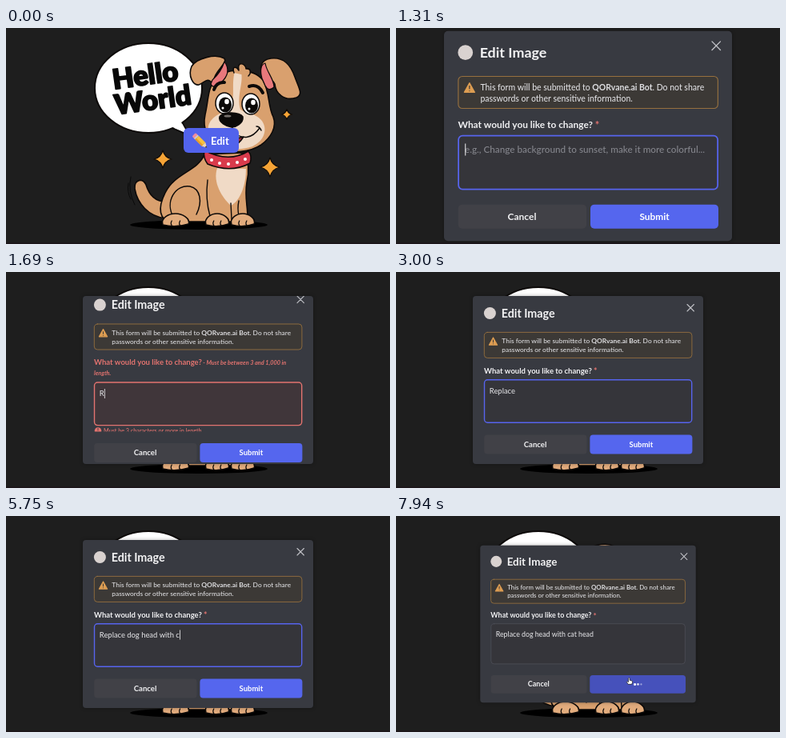
Recreate the animation shown at these times as an HTML page with a canvas. Size 480 by 270 pixels, loop 8000 ms.

```html
<!DOCTYPE html>
<html lang="en">
<head>
<meta charset="utf-8">
<title>Edit Image</title>
<style>
html, body { margin: 0; width: 100%; height: 100%; overflow: hidden; background: #1e1e1e; }
canvas { display: block; width: 480px; height: 270px; }
</style>
</head>
<body>
<canvas id="stage"></canvas>
<script>
const LOOP = 8000;
const FONT = 'Lato, "Open Sans", sans-serif';
const INK = '#0d0a09', TAN = '#d9a06e', CREAM = '#f0dac6', PINK = '#e8787c';
const BLURPLE = '#5566ee', RED = '#e2736f', MODAL = '#383a41';

const canvas = document.getElementById('stage');
const ctx = canvas.getContext('2d');
const dpr = window.devicePixelRatio || 1;
canvas.width = 480 * dpr;
canvas.height = 270 * dpr;

// Typing runs: start time, gap between keys, characters
const RUNS = [
  [1620, 0, 'R'], [1940, 62, 'eplace'], [2500, 0, ' '], [3190, 78, 'dog '],
  [3750, 98, 'head wit'], [5130, 0, 'h'], [5310, 0, ' '], [5750, 90, 'cat head']
];
const KEYS = RUNS.flatMap(([start, gap, s]) => [...s].map((ch, i) => ({ at: start + i * gap, ch })));

const clamp = v => Math.max(0, Math.min(1, v));
const progress = (t, from, to) => clamp((t - from) / (to - from));
const easeInOut = p => p * p * (3 - 2 * p);
const easeOut = p => 1 - (1 - p) ** 3;

// Rises to 1.25, then settles at 1
function pop(ms) {
  return ms < 180 ? 1.25 * easeOut(clamp(ms / 180)) : 1.25 - 0.25 * easeInOut(progress(ms, 200, 470));
}

function shape(d, fill, line = 1.6, stroke = INK) {
  const p = new Path2D(d);
  if (fill) { ctx.fillStyle = fill; ctx.fill(p); }
  if (line) { ctx.lineWidth = line; ctx.strokeStyle = stroke; ctx.stroke(p); }
}

function oval(x, y, rx, ry, fill, line = 0, tilt = 0) {
  ctx.beginPath();
  ctx.ellipse(x, y, rx, ry, tilt, 0, 7);
  ctx.fillStyle = fill;
  ctx.fill();
  if (line) { ctx.lineWidth = line; ctx.strokeStyle = INK; ctx.stroke(); }
}

function box(x, y, w, h, r, fill, stroke, line = 1) {
  ctx.beginPath();
  ctx.roundRect(x, y, w, h, r);
  ctx.fillStyle = fill;
  ctx.fill();
  if (stroke) { ctx.strokeStyle = stroke; ctx.lineWidth = line; ctx.stroke(); }
}

// Draws text and returns the x where it ends
function text(s, x, y, size, color, style = '500', align = 'left') {
  ctx.font = `${style} ${size}px ${FONT}`;
  ctx.fillStyle = color;
  ctx.textAlign = align;
  ctx.fillText(s, x, y);
  return x + ctx.measureText(s).width;
}

function scaled(x, y, s, draw) {
  ctx.save();
  ctx.translate(x, y);
  ctx.scale(s, s);
  ctx.translate(-x, -y);
  draw();
  ctx.restore();
}

function sparkle(x, y, r) {
  const k = r * 0.2;
  shape(`M${x} ${y - r}Q${x + k} ${y - k} ${x + r} ${y}Q${x + k} ${y + k} ${x} ${y + r}` +
    `Q${x - k} ${y + k} ${x - r} ${y}Q${x - k} ${y - k} ${x} ${y - r}Z`, '#f6a436', 1.2);
}

function bubble() {
  shape('M198 121L229 134L216 110Z', '#fff', 2);
  oval(178, 75, 67, 56, '#fff', 2);
  shape('M199 120L227 132L214 109Z', '#fff', 0);
  ctx.save();
  ctx.translate(174, 59);
  ctx.rotate(-0.14);
  ctx.strokeStyle = '#080808';
  ctx.lineWidth = 1.6;
  [['Hello', 0, 12], ['World', 5, 44]].forEach(([s, x, y]) => {
    text(s, x, y, 34.5, '#080808', '900', 'center');
    ctx.strokeText(s, x, y);
  });
  ctx.restore();
}

function paw(x, y, w) {
  shape(`M${x - w} ${y + 6}C${x - w - 3} ${y - 3} ${x - w / 2} ${y - 8} ${x} ${y - 8}` +
    `C${x + w / 2} ${y - 8} ${x + w + 3} ${y - 2} ${x + w} ${y + 5}Q${x} ${y + 10} ${x - w} ${y + 6}Z`, '#e2ac7d');
  [-0.3, 0.35].forEach(k => shape(`M${x + k * w} ${y + 1}q-2 3 0 6`, null, 1.2));
}

function body() {
  oval(241, 246, 86, 6, '#000');
  shape('M156 186Q152 204 161 221M153 194Q151 205 156 214', null, 1, '#0a0a0a');
  shape('M200 238C178 236 164 219 161 201C160 189 171 187 175 196C179 209 187 218 202 217Z', TAN);
  shape('M248 158C240 179 211 181 199 206C189 226 192 240 206 242L299 242C306 233 297 217 301 193C304 180 303 166 298 156Z', TAN);
  shape('M264 175C258 193 270 212 281 222C293 216 300 196 300 176Z', CREAM, 0);
  shape('M210 238C197 216 213 195 230 198C243 201 246 217 238 233', null, 1.5);
  shape('M252 190Q249 214 255 235M281 219L282 239M291 216Q289 226 291 234', null, 1.4);
  paw(212, 240, 16);
  paw(264, 240, 14);
  paw(296, 240, 14);
}

function collar() {
  shape('M248 153Q278 169 303 154Q308 160 305 169Q281 182 252 170Q246 162 248 153Z', '#d93b4c');
  [[257, 165], [267, 169], [278, 170], [289, 168], [299, 164]].forEach(([x, y]) => oval(x, y, 2, 2, '#fff'));
}

function eye(x, y) {
  oval(x, y, 11, 13, '#fff', 1.5);
  oval(x + 1, y + 2, 8, 9.5, '#0b0908');
  oval(x + 3, y - 2, 2.8, 3.2, '#fff');
  oval(x - 2, y + 6, 1.5, 1.5, '#fff');
}

function head() {
  shape('M261 63C252 77 253 91 249 108C245 126 253 141 266 149C282 158 306 155 319 146C331 137 339 124 334 111C327 97 330 80 321 65C309 50 276 49 261 63Z', TAN);
  shape('M286 54C281 74 288 85 279 103C259 108 249 119 254 133C263 152 288 155 308 148C323 141 328 126 319 115C311 106 301 107 293 102C288 84 297 70 294 55Z', CREAM, 0);
  shape('M260 64C262 53 277 44 273 38C262 32 239 37 232 48C227 60 234 72 241 71C249 68 251 61 258 69Z', TAN);
  shape('M258 65Q269 55 273 42Q283 56 268 69Q259 77 256 70Z', PINK, 1.2);
  shape('M322 64C316 51 317 40 331 38C348 36 356 47 361 61C366 75 372 83 363 87C348 92 337 82 336 70C333 64 327 62 322 64Z', TAN);
  shape('M320 63C317 52 319 45 324 44C326 56 335 63 335 74Q328 80 324 72Z', PINK, 1.2);
  shape('M285 56C282 47 288 48 291 53C288 41 300 44 300 51C306 50 307 56 303 60', TAN, 1.5);
  shape('M260 77Q263 67 273 68M304 73Q315 69 321 81', null, 4);
  eye(273, 94);
  eye(306, 95);
  shape('M267 111C271 104 292 105 296 111C297 119 287 124 282 124C276 123 265 118 267 111Z', '#0b0908');
  oval(277, 110, 4.5, 1.6, '#76706c');
  shape('M283 123V130M256 127Q267 143 283 130Q303 145 317 125M313 123Q317 123 319 128', null, 1.5);
  shape('M270 136Q283 158 297 136Q284 140 270 136Z', '#9e3039', 1.4);
}

function dog() {
  bubble();
  sparkle(196, 164, 11);
  sparkle(330, 174, 12);
  sparkle(351, 108, 6.5);
  body();
  collar();
  head();
}

function pencil(x, y) {
  ctx.save();
  ctx.translate(x, y);
  ctx.rotate(Math.PI / 4);
  box(-11, -3.2, 5, 6.4, 1.5, '#f08c9c');
  box(-7.5, -3.2, 2, 6.4, 0, '#c9cbd3');
  box(-5.5, -3.2, 12, 6.4, 0, '#f7c23e');
  box(-5.5, 1, 12, 2.2, 0, '#e59a2c');
  shape('M6.5 -3.2L12 0L6.5 3.2Z', '#f3d6ae', 0);
  shape('M10 -1.2L12.4 0L10 1.2Z', '#39312e', 0);
  ctx.restore();
}

function hand(x, y, s) {
  ctx.save();
  ctx.translate(x, y);
  ctx.scale(s, s);
  shape('M-1 1Q0 -.6 1 1V4L4.5 5Q5.5 5.5 5 7.5L4 10H-1.2L-3.6 6.6Q-3.4 5 -1 6.4Z', '#fff', 0.8, '#111');
  ctx.restore();
}

function editButton(t) {
  const s = t < 130 ? 1 : 1 + 1.39 * pop(t - 130);
  scaled(256.5, 140.5, s, () => {
    box(222, 125, 69, 31, 6, t > 760 ? '#4854cf' : '#5263ec');
    pencil(242.5, 141);
    text('Edit', 256, 145.7, 13, '#fff', '700');
  });
  if (t > 300) {
    const p = easeInOut(progress(t, 300, 880)), q = 1 - p;
    hand(q * q * 388 + 2 * q * p * 345 + p * p * 285, q * q * 52 + 2 * q * p * 250 + p * p * 150, 2.2);
  }
}

function warning() {
  box(110.3, 75.4, 259.6, 32, 4, '#3c3936', '#96703f', 0.9);
  shape('M121.5 82L126.6 91.2H116.4Z', '#dd9d52', 1.2, '#dd9d52');
  box(121, 84.6, 1, 3.6, 0.3, '#3c3936');
  box(121, 89.3, 1, 1, 0.5, '#3c3936');
  const color = '#dedee1';
  let x = text('This form will be submitted to ', 132.3, 89.2, 8.4, color);
  x = text('QORvane.ai Bot', x, 89.2, 8.4, color, '700');
  text('. Do not share', x, 89.2, 8.4, color);
  text('passwords or other sensitive information.', 132.3, 100.2, 8.4, color);
}

function field(t, typed, lastKey, focus, error) {
  const top = error ? 148.4 : 134.7;
  let border = focus ? '#5764ee' : '#50515a';
  if (error) border = RED;
  box(110.5, top, 259.2, 53.6, 4, error ? '#40363a' : '#35353a', border, focus ? 1.4 : 0.8);
  const base = top + 17.2;
  let end = 116.8;
  if (typed) end = text(typed, end, base, 9.4, '#dcdcdf');
  else text('e.g., Change background to sunset, make it more colorful...', end, base, 9.4, '#84858c');
  if (focus && (t - lastKey) % 1000 < 500) box(end + 0.2, base - 9.3, 0.8, 12, 0, '#f0f0f2');
}

function form(t, typed, lastKey, focus, error) {
  oval(117.4, 51.5, 7.5, 7.5, '#d9d2d0');
  text('Edit Image', 131.7, 56.7, 14.3, '#f4f4f5', '700');
  shape('M364 40.5L372.4 49M372.4 40.5L364 49', null, 1.1, '#c0c1c6');
  warning();
  const x = text('What would you like to change?', 110, 126.8, 9.5, error ? RED : '#f1f1f3', '700');
  if (error) {
    text(' - Must be between 3 and 1,000 in', x, 126.8, 7.3, RED, 'italic 700');
    text('length.', 110, 139.6, 7.3, RED, 'italic 700');
    oval(115, 209, 4.3, 4.3, RED);
    text('!', 115, 211.5, 7, MODAL, '700', 'center');
    text('Must be 3 characters or more in length.', 122, 211.6, 7.2, RED);
  } else {
    text('*', x + 2.2, 127.8, 10.5, RED, '700');
  }
  field(t, typed, lastKey, focus, error);
}

function footer(t, shift, hover, sent) {
  const y = 203.5 + shift;
  box(110.2, y, 128.3, 24.1, 4, '#414147');
  text('Cancel', 174, y + 15.3, 9.6, '#f1f1f3', '700', 'center');
  box(242.4, y, 128, 24.1, 4, hover ? '#4651bb' : BLURPLE);
  if (!sent) {
    text('Submit', 306.4, y + 15.3, 9.5, '#fff', '700', 'center');
    return;
  }
  for (let i = 0; i < 3; i++) {
    const glow = 0.5 + 0.5 * Math.cos((t - 7940) / 160 - i * 1.1);
    ctx.globalAlpha = 0.35 + 0.65 * glow;
    oval(302.6 + i * 4.2, y + 12.1, 1.1 + 0.5 * glow, 1.1 + 0.5 * glow, '#fff');
  }
  ctx.globalAlpha = 1;
}

function modalScale(t) {
  if (t < 7630) return pop(t - 1130);
  const p = (t - 7630) / 585;
  return 1 - p * p * (1.65 * p - 0.65);
}

function modal(t) {
  const hit = KEYS.filter(k => k.at <= t);
  const typed = hit.map(k => k.ch).join('');
  const lastKey = hit.length ? hit[hit.length - 1].at : 1130;
  const error = typed.length > 0 && typed.length < 3;
  const sent = t >= 7630;
  const shift = error ? 10.4 : 0;
  const move = easeInOut(progress(t, 7000, 7440));
  const handY = 231 - 24.5 * move;

  scaled(240, 135, modalScale(t), () => {
    ctx.save();
    ctx.shadowColor = 'rgba(0,0,0,.3)';
    ctx.shadowBlur = 5 * dpr;
    box(96, 30, 288, 210, 4, MODAL);
    ctx.restore();

    ctx.save();
    ctx.beginPath();
    ctx.roundRect(96, 30, 288, error ? 169.6 : 210, 4);
    ctx.clip();
    ctx.translate(0, -shift);
    form(t, typed, lastKey, !sent, error);
    ctx.restore();

    footer(t, shift, move > 0 && handY < 226, sent);
    if (move > 0) hand(322 - 27.2 * move, handY, 0.9);
  });
}

function draw(t) {
  ctx.setTransform(dpr, 0, 0, dpr, 0, 0);
  ctx.lineCap = ctx.lineJoin = 'round';
  ctx.fillStyle = '#1e1e1e';
  ctx.fillRect(0, 0, 480, 270);
  ctx.fillStyle = '#1c171a';
  ctx.fillRect(0, 268, 480, 2);
  dog();
  if (t < 1130) editButton(t);
  else modal(t);
}

function tick() {
  draw(performance.now() % LOOP);
  requestAnimationFrame(tick);
}
tick();
</script>
</body>
</html>
```
